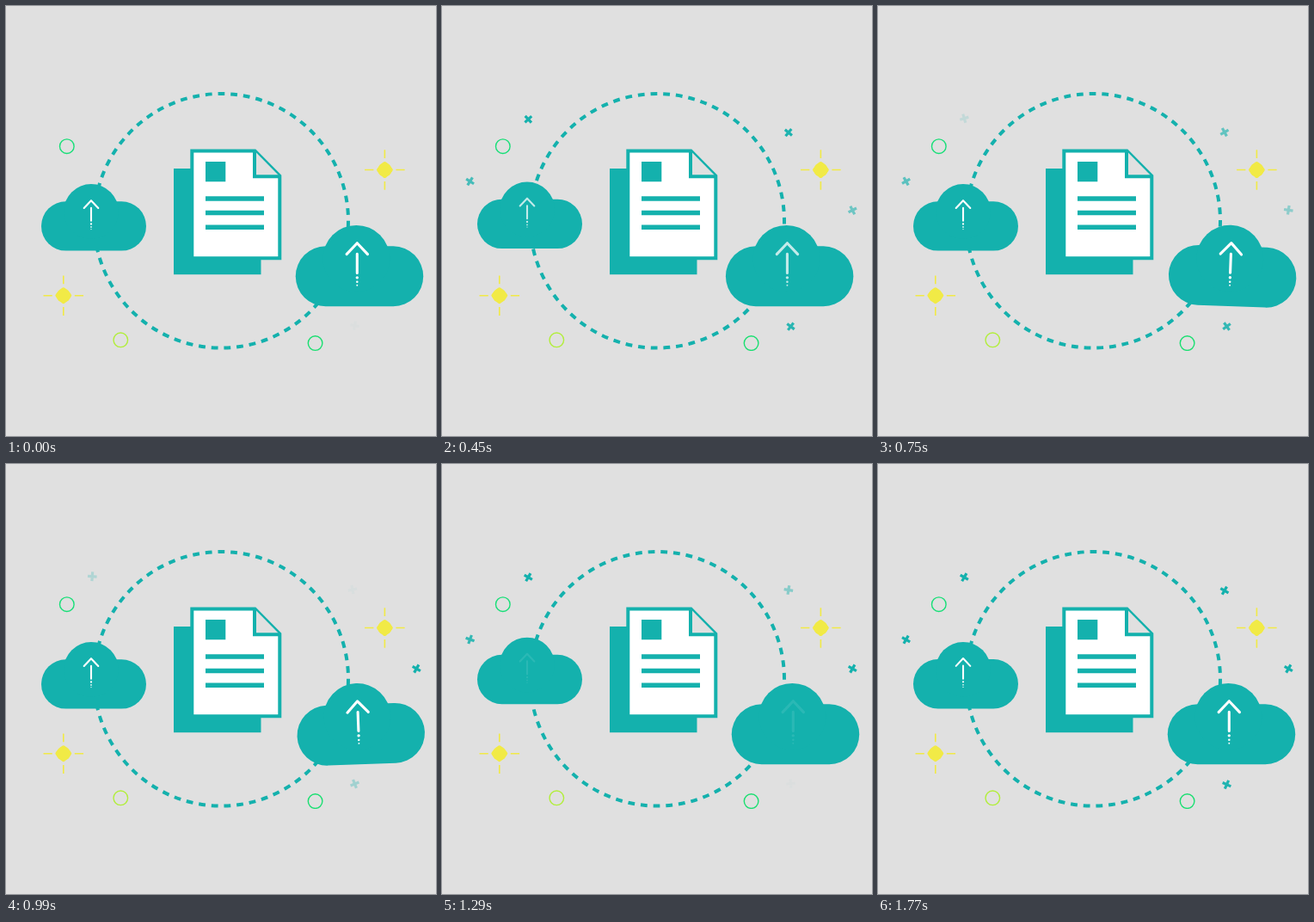
These frames come from a looping animation (500x500 px, 1.83 s). An HTML page:

```html
<!DOCTYPE html>
<html lang="en">
<head>
<meta charset="utf-8">
<title>Cloud upload</title>
<style>
  html, body { margin: 0; width: 100%; height: 100%; overflow: hidden; background: #e0e0e0; }
  svg { display: block; width: 100vw; height: 100vh; }
  .teal { fill: #14b1ad; }
  .edge { stroke: #14b1ad; stroke-width: 4; }
  .arrow { fill: none; stroke: #fff; stroke-width: 2.1; stroke-linecap: round; stroke-linejoin: round; }
  .arrow circle { fill: #fff; stroke: none; }
  .bubble { fill: none; stroke-width: 1.4; }
</style>
</head>
<body>
<svg viewBox="0 0 500 500">
  <defs>
    <g id="cloud" class="teal">
      <rect x="-61" y="-57.4" width="122" height="57.4" rx="28.7"/>
      <circle cx="-3" cy="-45.5" r="32"/>
    </g>
    <g id="arrow" class="arrow">
      <path d="M-8.3 8.8L0 0L8.3 8.8M0 8.6V23.6"/>
      <circle cy="27.3" r="1.15"/>
      <circle cy="30.7" r=".85"/>
      <circle cy="33.4" r=".65"/>
    </g>
    <g id="star" fill="#f1ea46">
      <circle r="8.2"/>
      <rect x="-7.4" y="-7.4" width="14.8" height="14.8" rx="2.6" transform="rotate(45)"/>
      <path d="M-23.3 0H-13M13 0H23.3M0-23.3V-13.4M0 13.4V23.3" stroke="#f1ea46" stroke-width="1.6"/>
    </g>
    <path id="cross" d="M-5.3 0H5.3M0-5.3V5.3" stroke="#14b1ad" stroke-width="3.2"/>
  </defs>

  <circle id="ring" class="edge" cx="250.2" cy="249.8" r="147.8" fill="none"
          pathLength="63" stroke-dasharray=".53 .47"/>

  <rect class="teal" x="195" y="189" width="101.5" height="123.2"/>
  <path class="edge" fill="#fff" d="M216.3 168.4H289.5L318.3 197.6V293.3H216.3Z"/>
  <path class="edge" fill="#e0e0e0" d="M289 168.6V198.2H318.3"/>
  <path class="teal" d="M232 181h23.3v23.3h-23.3zM232 221.2h68v5.6h-68zM232 237.8h68v5.5h-68zM232 254.4h68v5.6h-68z"/>

  <circle class="bubble" cx="70.8" cy="163.2" r="8.3" stroke="#18df78"/>
  <circle class="bubble" cx="133.3" cy="388.3" r="8.3" stroke="#b2ee3c"/>
  <circle class="bubble" cx="359.6" cy="392.1" r="8.3" stroke="#18df70"/>
  <use href="#star" x="440.4" y="190.5"/>
  <use href="#star" x="66.8" y="336.7"/>

  <g id="crosses"></g>

  <g id="left">
    <use href="#cloud" transform="translate(102 284.6)"/>
    <use id="leftArrow" href="#arrow" transform="translate(99 226.2)"/>
  </g>
  <g id="right">
    <use href="#cloud" transform="translate(411 349.2) scale(1.217)"/>
    <use id="rightArrow" href="#arrow" transform="translate(408.3 275.7) scale(1.47)"/>
  </g>
</svg>
<script>
const LOOP = 1830, STEP = 30, STEPS = 60;
const BEAT = 37;               // step at which the second upload begins
const RISE = 5, SETTLE = 24;   // steps from the start of an upload
const $ = id => document.getElementById(id);

const clamp = p => Math.min(1, Math.max(0, p));
const smooth = p => (1 - Math.cos(Math.PI * p)) / 2;
const easeOut = (p, power) => 1 - Math.pow(1 - p, power);
// One full sine swing between two steps, still outside them.
const swing = p => Math.sin(2 * Math.PI * clamp(p));

// Each cross blinks from its start step and stays lit at its second peak.
const crosses = [
  { x: 100.3, y: 130.5, start: 0, period: 28.5 },
  { x: 32.6, y: 203, start: 6, period: 27 },
  { x: 402.9, y: 146, start: 0, period: 35 },
  { x: 477.3, y: 236.8, start: 0, period: 20.5 },
  { x: 405.5, y: 371.6, start: -2, period: 43 }
];

for (const c of crosses) {
  c.el = document.createElementNS("http://www.w3.org/2000/svg", "use");
  c.el.setAttribute("href", "#cross");
  $("crosses").append(c.el);
}

function drawCross(c, n) {
  const cycle = Math.min(1.5, Math.max(0, (n - c.start) / c.period));
  const fade = Math.sin(Math.PI * cycle) ** 2;
  const turn = 30 + 75 * (cycle - 1.5);
  c.el.setAttribute("opacity", fade);
  c.el.setAttribute("transform", `translate(${c.x} ${c.y + 1.2 * fade}) rotate(${turn})`);
}

function draw(n) {
  const second = n >= BEAT;
  const k = second ? n - BEAT : n;
  const length = second ? STEPS - BEAT : BEAT;

  // The ring advances one dash per upload.
  $("ring").setAttribute("stroke-dashoffset", -easeOut(k / length, 2.5));

  // The cloud jumps as the arrow vanishes, then sinks as it returns.
  const up = clamp(k / RISE), down = clamp((k - RISE) / (SETTLE - RISE));
  const lift = 5.5 * (smooth(up) - smooth(down));
  const fade = 1 - up + easeOut(down, 1.8);
  $("left").setAttribute("transform", `translate(0 ${-lift})`);
  $("leftArrow").setAttribute("opacity", fade);
  $("rightArrow").setAttribute("opacity", fade);

  const p = clamp((n - 8) / 30);
  const slide = -9 * (1 - p) * swing(p);
  const lean = 2.2 * swing((n - 19) / 20);
  $("right").setAttribute("transform", `translate(${slide} 0) rotate(${lean} 411 302)`);

  for (const c of crosses) drawCross(c, n);
}

const start = performance.now();
function tick() {
  const t = (performance.now() - start) % LOOP;
  draw(Math.min(STEPS - 1, Math.floor(t / STEP)));
  requestAnimationFrame(tick);
}
tick();
</script>
</body>
</html>
```
